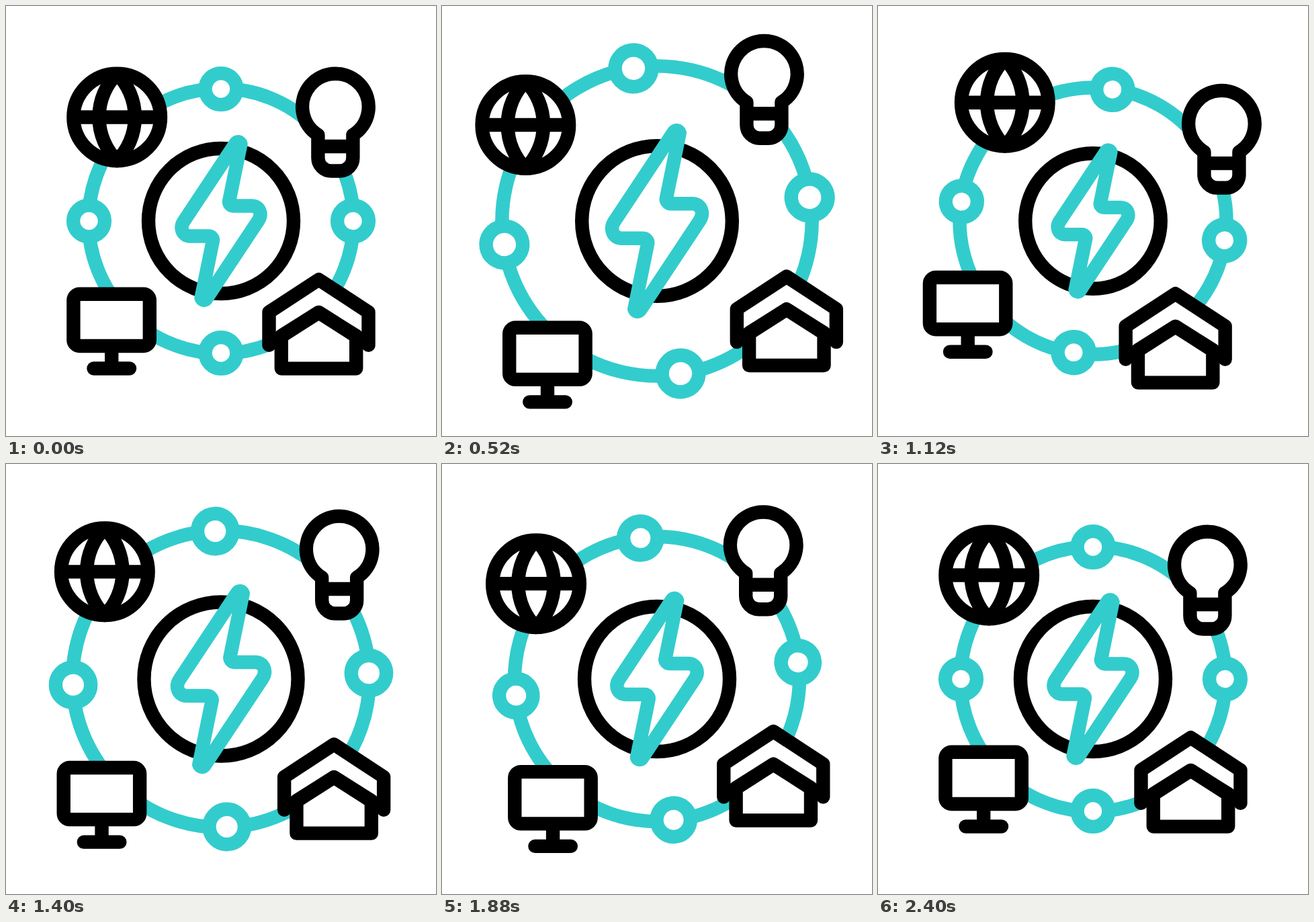
Recreate the animation shown at these times as an HTML page. Size 640 by 640 pixels, loop 2440 ms.

```html
<!DOCTYPE html>
<html lang="en">
<head>
<meta charset="utf-8">
<title>Energy network</title>
<style>
  html, body { margin: 0; width: 100%; height: 100%; overflow: hidden; background: #fff; }
  svg { display: block; width: 640px; height: 640px; }
  svg * {
    vector-effect: non-scaling-stroke;
    stroke-width: 20.4px;
    stroke-linejoin: round;
  }
  .dark { stroke: #000; fill: #fff; }
  .teal { stroke: #33cccc; fill: #fff; }
  .cap { stroke-linecap: round; }
  .line { fill: none; }
</style>
</head>
<body>
<svg viewBox="0 0 640 640">
  <g id="ring" class="teal">
    <circle r="197.2" class="line"/>
    <circle cy="-196.5" r="23.4"/>
    <circle cx="196.5" r="23.4"/>
    <circle cy="196.5" r="23.4"/>
    <circle cx="-196.5" r="23.4"/>
  </g>

  <circle id="hub" class="dark" cx="320" cy="320" r="108"/>
  <path id="bolt" class="teal" d="M29.5-114.6L12.2-30C11.3-26 14.3-22.5 18.3-22.5H46
    C57.2-22.5 62-10.5 55.5-.6L-21.5 115.4A4.3 4.3 0 0 1-29.5 114.6L-12.2 30
    C-11.3 26-14.3 22.5-18.3 22.5H-46C-57.2 22.5-62 10.5-55.5 .6L21.5-115.4
    A4.3 4.3 0 0 1 29.5-114.6Z"/>

  <g id="globe" class="dark">
    <circle cx="165.2" cy="165.5" r="64.8"/>
    <path class="line" d="M100.4 165.5h129.6M165.2 100.7a92 92 0 0 0 0 129.6a92 92 0 0 0 0-129.6"/>
  </g>

  <g id="bulb" class="dark">
    <path d="M464.4 191.9A49.3 49.3 0 1 1 516.4 191.9V226A19.5 19.5 0 0 1 496.9 245.5
      H483.9A19.5 19.5 0 0 1 464.4 226Z"/>
    <path d="M464.4 209h52"/>
  </g>

  <g id="house" class="dark">
    <path class="cap" d="M391.5 504.7V455.6L465.5 407.2L539.5 455.6V504.7"/>
    <path d="M409.8 491V539.6H521.2V491L465.5 456Z"/>
    <path class="line cap" d="M401 497.5L465.5 456L530 497.5"/>
  </g>

  <g id="monitor" class="dark">
    <rect x="100.4" y="428.8" width="113.4" height="77.2" rx="9"/>
    <path d="M157.2 506V539.5"/>
    <path class="cap" d="M130.5 539.5H184"/>
  </g>
</svg>
<script>
  const LOOP = 2440, STEP = 40, MID = 320;

  // Tracks of [time in ms, value], eased between neighbours
  const tracks = {
    angle:  [[0, 0], [500, -8.85], [980, 10.2], [1680, -8.85], [2290, 0]],
    spread: [[0, 0], [500, 1], [1050, 0], [1600, 1], [2120, 0]],
    bolt:   [[0, 1], [500, 1.145], [1080, .89], [1500, 1.145], [2000, 1]],
    hub:    [[0, 108], [376, 118], [820, 92], [1580, 118], [1880, 108]]
  };

  // Orbit point relative to the middle, and how far it travels outwards
  const icons = [
    { id: 'globe',   at: [-155, -154.5], out: [-16.8, -16.8] },
    { id: 'bulb',    at: [167, -151],    out: [17.7, -22.7] },
    { id: 'house',   at: [148, 151],     out: [22.8, 23.6] },
    { id: 'monitor', at: [-163, 164],    out: [-31, 22.6] }
  ];

  const el = id => document.getElementById(id);
  const place = (id, value) => el(id).setAttribute('transform', value);

  function sample(keys, t) {
    const i = keys.findIndex(k => k[0] > t);
    if (i < 0) return keys[keys.length - 1][1];
    const [t0, a] = keys[i - 1], [t1, b] = keys[i];
    return a + (b - a) * (1 - Math.cos(Math.PI * (t - t0) / (t1 - t0))) / 2;
  }

  function draw(t) {
    const angle = sample(tracks.angle, t);
    const spread = sample(tracks.spread, t);
    const rad = angle * Math.PI / 180, cos = Math.cos(rad), sin = Math.sin(rad);

    place('ring', `translate(${MID} ${MID}) rotate(${angle}) scale(${1 + .17 * spread})`);
    place('bolt', `translate(${MID} ${MID}) scale(${sample(tracks.bolt, t)})`);
    el('hub').setAttribute('r', sample(tracks.hub, t));

    for (const { id, at, out } of icons) {
      const x = at[0] + out[0] * spread, y = at[1] + out[1] * spread;
      place(id, `translate(${x * cos - y * sin - at[0]} ${x * sin + y * cos - at[1]})`);
    }
  }

  const start = performance.now();
  function tick() {
    const t = (performance.now() - start) % LOOP;
    draw(Math.floor(t / STEP) * STEP);
    requestAnimationFrame(tick);
  }
  draw(0);
  requestAnimationFrame(tick);
</script>
</body>
</html>
```
